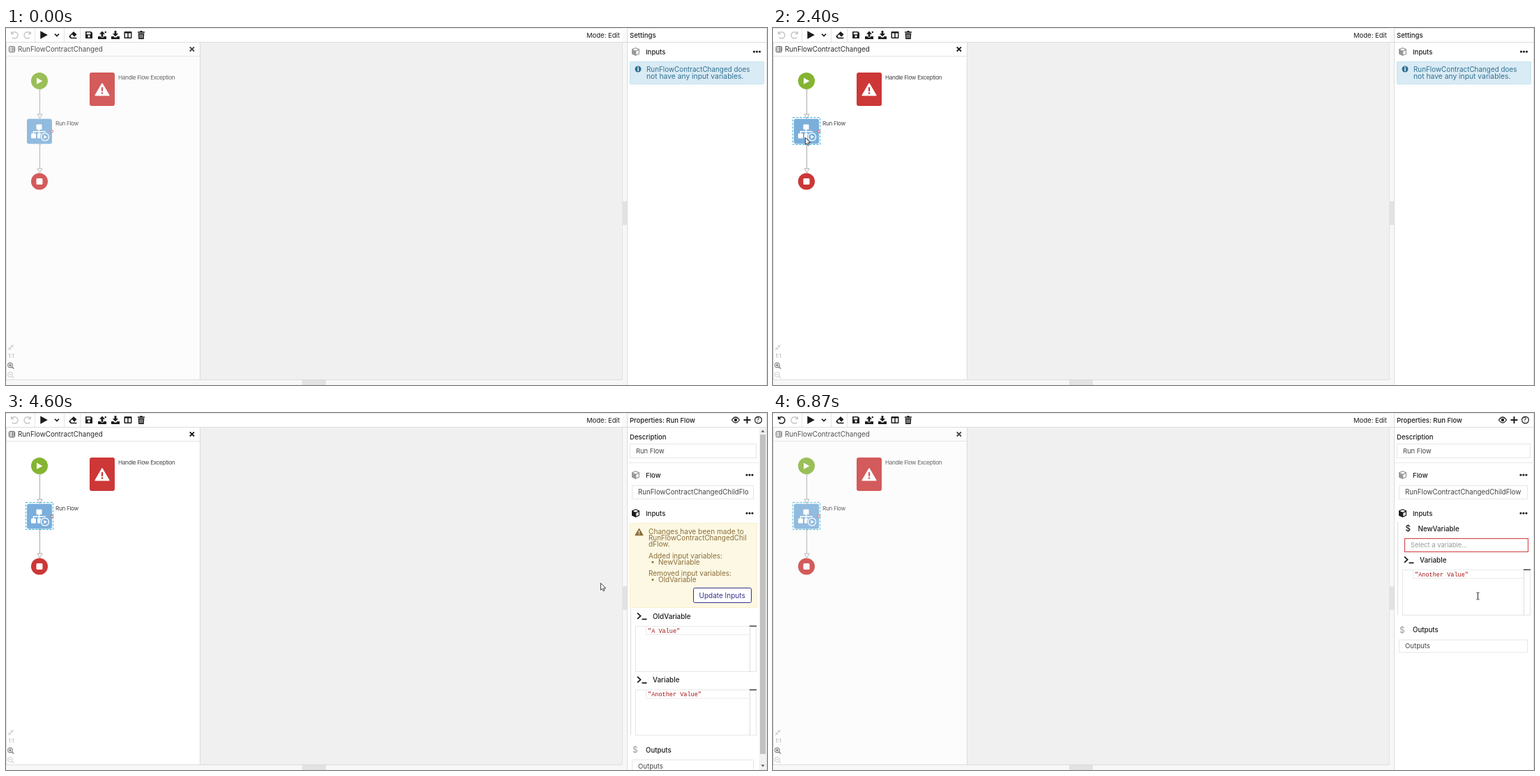
Write an HTML page that moves like this. It is 1092x513 px and loops after 7.67 s.

```html
<!DOCTYPE html>
<html lang="en">
<head>
<meta charset="utf-8">
<title>Flow editor</title>
<style>
  html, body { margin: 0; width: 100%; height: 100%; overflow: hidden; background: #fff; }
  svg { display: block; width: 100%; height: 100%; }
  text { font-family: Inter, "Open Sans", sans-serif; white-space: pre; }
  .mono { font-family: "Liberation Mono", "DejaVu Sans Mono", monospace; }
  .label { letter-spacing: -.33px; }
</style>
</head>
<body>
<svg id="stage" viewBox="0 0 1092 513"></svg>
<script>
const INK = '#1c1c1c', SOFT = '#444', LINE = '#dcdcdc', FIELD = '#e6e6e6',
  PALE = '#c8c8c8', NAVY = '#34328c', BROWN = '#8a6d3b';

// y is the middle of the capitals
const text = (x, y, s, size = 9.8, fill = INK, extra = '') =>
  `<text x="${x}" y="${y + size * .36}" font-size="${size}" fill="${fill}" ${extra}>${s}</text>`;
const strong = (x, y, s, size = 9.6) => text(x, y, s, size, INK, 'font-weight="500"');
const rect = (x, y, w, h, fill, extra = '') =>
  `<rect x="${x}" y="${y}" width="${w}" height="${h}" fill="${fill}" ${extra}/>`;
const frame = (x1, y1, x2, y2, stroke = FIELD, fill = '#fff', extra = '') =>
  rect(x1 + .5, y1 + .5, x2 - x1 - 1, y2 - y1 - 1, fill, `stroke="${stroke}" ${extra}`);
const fillPath = (d, fill = INK, extra = '') => `<path d="${d}" fill="${fill}" ${extra}/>`;
const linePath = (d, stroke = INK, w = 1, extra = '') =>
  `<path d="${d}" fill="none" stroke="${stroke}" stroke-width="${w}" ${extra}/>`;
const dot = (x, y, r, fill, extra = '') => `<circle cx="${x}" cy="${y}" r="${r}" fill="${fill}" ${extra}/>`;
const at = (x, y, s, extra = '') => `<g transform="translate(${x} ${y}) ${extra}">${s}</g>`;
const group = (id, s) => `<g id="${id}">${s}</g>`;

const undoArrow = linePath('M-4.3 -5V-1.4H-.8M-4 -1.6A4.7 4.7 0 1 1 -3.3 3.4', 'currentColor', 1.5);
const more = (x, y) => [-4, 0, 4].map(d => dot(x + d, y, 1.6, INK)).join('');
const cube = (y, color) => at(903.5, y,
  fillPath('M0 -6L5.5 -3.7V3.4L0 6L-5.5 3.4V-3.7Z', color) +
  fillPath('M0 -4.7L3.9 -3.1L0 -1.5L-3.9 -3.1ZM.8 -.2L4.3 -1.7V2.7L.8 4.3Z', '#fff'));
const prompt = y => linePath(`M906 ${y - 4.5}l4.6 4.2l-4.6 4.2M912.5 ${y + 4.3}h7`, INK, 1.7);
const warning = (x, y, size, fill, mark) => at(x, y,
  fillPath('M0 -8.5L10 8.5H-10Z', fill, `stroke="${fill}" stroke-width="2" stroke-linejoin="round"`) +
  rect(-1.2, -3.5, 2.4, 6, mark) + dot(0, 5.2, 1.4, mark), `scale(${size})`);

function toolbar() {
  const tray = fillPath('M-6 2H-2.5L-1.5 3.5H1.5L2.5 2H6V6H-6Z');
  const arrow = (y, flip) => at(0, y, fillPath('M-1.4 4V0H-4L0 -4.3L4 0H1.4V4Z'), `scale(1 ${flip})`);
  return rect(0, 0, 1092, 21, '#fff') + rect(0, 0, 1092, 1, '#e6e6e6') + rect(0, 20, 1092, 1, LINE) +
    [41, 83, 106].map(x => rect(x, 1, 1, 19, '#e4e4e4')).join('') +
    `<g id="undo">${at(12, 10, undoArrow)}</g>` +
    `<g color="${PALE}">${at(31, 10, undoArrow, 'scale(-1 1)')}</g>` +
    fillPath('M49.3 4.2L59.8 10L49.3 15.8Z') +
    linePath('M70 8.5L73 11.5L76 8.5', INK, 1.7) +
    at(96, 10, fillPath('M-5.5 1.5L1 -5L5.5 -.8L1 3.8H5.5V5.2H-3L-5.5 2.8Z') +
      fillPath('M-3.7 1.7L-1.2 -.8L2 2.4L.6 3.8H-2Z', '#fff')) +
    at(119, 10, fillPath('M-5 -5H3L5 -3V5H-5Z') + rect(-3.3, -3.6, 5.6, 2.8, '#fff') + dot(0, 2, 1.7, '#fff')) +
    at(138, 10, tray + arrow(-1.2, 1)) + dot(142.8, 6, 1.2, INK) + at(157, 10, tray + arrow(-2, -1)) +
    at(175, 10, rect(-5.5, -5, 11, 10, INK, 'rx="1"') + rect(-4, -2.5, 3.3, 6, '#fff') + rect(.8, -2.5, 3.3, 6, '#fff')) +
    at(194, 10, fillPath('M-5 -4.7H-2L-1.2 -6H1.2L2 -4.7H5V-3.3H-5ZM-4.3 -2.5H4.3L3.8 6H-3.8Z') +
      linePath('M-2 -1V4.5M0 -1V4.5M2 -1V4.5', '#fff', .8)) +
    text(833, 10.5, 'Mode: Edit', 9.5);
}

function flowPanel() {
  const red = '#cd3737';
  const link = (y1, y2) => linePath(`M48.5 ${y1}V${y2 - 6}`, '#aaa') +
    dot(48.5, y1, 1.5, '#fff', 'stroke="#aaa" stroke-width=".8"') +
    fillPath(`M45 ${y2 - 6}H52L48.5 ${y2}Z`, '#fff', 'stroke="#999" stroke-width=".8"');
  return rect(0, 21, 278, 485, '#fff') + rect(0, 40, 278, 1, '#e2e2e2') + rect(0, 21, 1, 485, LINE) +
    frame(4, 26, 13, 35, '#444', '#fff', 'rx="1"') +
    linePath('M6 28.5H7M8 28.5H11.5M6 30.5H7M8 30.5H11.5M6 32.5H7M8 32.5H11.5', '#444') +
    text(17, 30.5, 'RunFlowContractChanged', 9.8, '#2c2c2c') +
    linePath('M263.8 27.3L270 33.5M270 27.3L263.8 33.5', INK, 1.9) +
    link(88, 130) + link(167, 208) +
    dot(48, 76, 12, '#85b431') + fillPath('M44 71.6L52.4 76.2L44 80.8Z', '#fff') +
    rect(120, 64, 36, 48, red, 'rx="3"') + warning(138, 88.5, .96, '#fff', red) +
    text(161, 71.5, 'Handle Flow Exception', 8.2, SOFT, 'class="label"') +
    rect(30, 130.5, 36, 36, '#7aaedb', 'rx="3"') +
    rect(43.5, 138.5, 8, 7.5, '#fff', 'rx="1"') + rect(36, 151.5, 7, 7, '#fff', 'rx="1"') +
    rect(45, 151.5, 6, 7, '#fff', 'rx="1"') + linePath('M47.5 145V152M39.5 152V148.8H56V152', '#fff', 1.5) +
    dot(56, 156.5, 6.6, '#fff', 'stroke="#7aaedb"') + dot(56, 156.5, 4.8, '#7aaedb') +
    fillPath('M54.3 153.7L59 156.5L54.3 159.3Z', '#fff') +
    dot(66, 148.5, 1.7, '#fff', `stroke="${red}" stroke-width=".9"`) +
    text(71, 137.5, 'Run Flow', 8.2, SOFT, 'class="label"') +
    group('selection', frame(28, 128, 68, 168, '#35b3d6', 'none', 'stroke-dasharray="3 2"')) +
    dot(48, 220.5, 12, red) + rect(43.5, 216, 9, 9, '#fff', 'rx="1.5"');
}

function zoomTools() {
  const lens = (y, color, sign) => `<circle cx="6" cy="${y}" r="3.5" fill="none" stroke="${color}"/>` +
    linePath(`M8.5 ${y + 2.5}L11.3 ${y + 5.2}${sign}`, color, 1.1);
  return linePath('M3 463L6.3 459.8M3.6 459.8H6.3V462.5M11 455L7.7 458.2M10.4 458.2H7.7V455.5', '#bbb', .9) +
    text(3.5, 471.5, '1:1', 7.5, '#aaa') +
    lens(484.5, '#666', 'M4 484.5H8M6 482.5V486.5') + lens(498, '#ccc', 'M4 498H8');
}

function settingsPanel() {
  const blue = '#31708f';
  return strong(895, 10.5, 'Settings') + cube(34, '#999') + strong(918, 34.5, 'Inputs') + more(1077.5, 34) +
    frame(895, 48, 1088, 81, '#c5e3ef', '#d9ebf5', 'rx="1"') +
    dot(907, 59, 4.5, blue) + rect(906.3, 58, 1.5, 3.8, '#fff') + dot(907, 56.5, .9, '#fff') +
    text(919, 59.5, 'RunFlowContractChanged does', 9.9, blue) +
    text(919, 68.8, 'not have any input variables.', 10.3, blue);
}

function propertiesTop(right) {
  return strong(895, 10.5, 'Properties: Run Flow', 9.5) +
    at(1047, 10, linePath('M-5.5 0Q0 -8 5.5 0Q0 8 -5.5 0Z', INK, 1.3) + dot(0, 0, 2.2, INK)) +
    linePath('M1058.5 10H1068.5M1063.5 5V15', INK, 2) +
    dot(1079.5, 10, 4.9, '#fff', `stroke="${INK}" stroke-width="1.2"`) + strong(1076.8, 10.2, '?', 8.5) +
    strong(895, 34.5, 'Description') + frame(895, 44, right, 65) + text(904, 54.5, 'Run Flow', 9.4, SOFT) +
    rect(893, 71, right - 890, 1, '#e8e8e8') +
    cube(89, '#999') + strong(918, 89.5, 'Flow') + more(right - 10, 89) + frame(898, 104, right - 4, 124) +
    `<svg x="899" y="104" width="${right - 911 + (right > 1080 ? 4 : 0)}" height="20">` +
    text(8, 9.7, 'RunFlowContractChangedChildFlow', 9.75, SOFT) + '</svg>' +
    cube(144, INK) + strong(918, 144.5, 'Inputs') + more(right - 10, 144);
}

function editor(name, y, right, value) {
  return prompt(y) + strong(928, y + .3, name, 9.9) +
    frame(903, y + 14, right, y + 80, FIELD) + frame(918, y + 14, right - 9, y + 27, '#ebebeb') +
    rect(right - 10, y + 14, 1, 66, LINE) + rect(right - 10, y + 13.5, 10, 1.5, '#444') +
    text(921, y + 20.5, `"${value}"`, 8.55, 'currentColor', 'class="mono"');
}

const outputs = (y, right) => text(899, y, '$', 12, '#999') + strong(918, y + .3, 'Outputs', 9.7) +
  frame(898, y + 14, right - 4, y + 33) + text(907, y + 23.3, 'Outputs', 9.6, SOFT);

function changedPanel() {
  const note = (x, y, s, size = 10) => text(x, y, s, size, BROWN);
  const bullet = (y, s) => dot(928, y, 1.5, BROWN) + note(936, y, s);
  return propertiesTop(1077) +
    frame(895, 158, 1078, 280, '#f8f0cf', '#fcf8e3') + warning(908.5, 171, .55, BROWN, '#fcf8e3') +
    note(922, 170, 'Changes have been made to', 10.15) + note(922, 179.5, 'RunFlowContractChangedChil', 9.9) +
    note(922, 188.8, 'dFlow.') + note(922, 205, 'Added input variables:') + bullet(214.3, 'NewVariable') +
    note(922, 230, 'Removed input variables:') + bullet(239.6, 'OldVariable') +
    '<rect id="button" x="986.5" y="251.5" width="83" height="21" rx="2"/>' +
    group('focus', frame(986, 251, 1070, 273, '#6e6cb0', 'none', 'rx="2"') +
      rect(988, 253, 80, 18, 'none', 'rx="1" stroke="#1d1b4a" stroke-width="2"')) +
    text(994.5, 262, 'Update Inputs', 10, NAVY) +
    rect(896, 281, 1, 182, '#ddd') + editor('OldVariable', 292, 1077, 'A Value') +
    editor('Variable', 383.5, 1077, 'Another Value') + outputs(484, 1077) +
    rect(1081, 21, 10, 492, '#f1f1f1') + rect(1082, 31, 8, 459, '#c1c1c1') +
    fillPath('M1083.5 27.5L1086 24.5L1088.5 27.5ZM1083.5 505.5L1086 508.5L1088.5 505.5Z', '#555');
}

function updatedPanel() {
  return propertiesTop(1087) + rect(896, 156, 1, 134, '#ddd') +
    strong(907.5, 166, '$', 11.5) + strong(925.5, 166.3, 'NewVariable', 9.8) +
    frame(906, 180, 1084, 200, '#d03a3a') + text(915, 190, 'Select a variable...', 9.4, '#999') +
    editor('Variable', 211, 1087, 'Another Value') + outputs(311.5, 1087);
}

const pointers = {
  arrow: fillPath('M.4 .5V10.4L2.7 8.4L4.2 11.8L5.9 11L4.4 7.8H7.6Z', '#fff', 'stroke="#111" stroke-width=".8"'),
  hand: fillPath('M-1.2 1Q0 -.6 1.2 1V5L5.4 6Q6.3 6.3 6.2 7.5L5.3 11V13.7H-.8V12L-3.8 8.3Q-4 6.8 -2.6 7L-1.2 8.3Z',
    '#fff', 'stroke="#111" stroke-width=".8"') + linePath('M1.2 5V8M3 5.6V8M4.7 6V8', '#111', .6),
  beam: at(1.5, 1, linePath('M-2 -5H-.6L0 -4.4L.6 -5H2M0 -4.4V4.4M-2 5H-.6L0 4.4L.6 5H2', '#222'))
};

document.getElementById('stage').innerHTML =
  rect(0, 0, 1092, 513, '#f7f7f7') + rect(0, 21, 884, 485, '#f0f0f0') +
  group('flow', flowPanel()) + zoomTools() + rect(278, 21, 1, 485, LINE) +
  rect(0, 505, 884, 1, LINE) + rect(425, 506, 34, 7, '#e2e2e2') +
  rect(884, 21, 1, 485, '#e4e4e4') + rect(884, 249, 7, 34, '#e2e2e2') +
  toolbar() + rect(884, 0, 7, 20, '#fafafa') +
  rect(891, 0, 201, 513, '#fff') + rect(891, 0, 201, 1, '#e6e6e6') + rect(891, 0, 1, 513, LINE) +
  rect(1091, 0, 1, 513, '#e0e0e0') + rect(891, 20, 201, 1, LINE) +
  group('settings', settingsPanel()) + group('changed', changedPanel()) + group('updated', updatedPanel()) +
  group('pointer', Object.keys(pointers).map(k => group(k, pointers[k])).join(''));

const el = id => document.getElementById(id);
const show = (id, on) => el(id).style.display = on ? '' : 'none';

// start, end, steps, then the place reached by the end
const moves = [
  [270, 1000, 12, 382, 347], [1070, 1800, 12, 47, 159], [1870, 2000, 2, 46, 157],
  [3400, 4130, 12, 611, 214], [4200, 4930, 12, 996, 262], [5000, 5070, 2, 1010, 262]
];

function pointerAt(t) {
  let x = 1096, y = 516;
  for (const [start, end, steps, toX, toY] of moves) {
    if (t < start) break;
    const step = Math.floor((t - start) / (end - start) * (steps - 1) + .1) + 1;
    const eased = (1 - Math.cos(Math.PI * Math.min(1, step / steps))) / 2;
    x += (toX - x) * eased;
    y += (toY - y) * eased;
  }
  return [x, y];
}

function draw(t) {
  const [x, y] = pointerAt(t);
  const pressed = t >= 5600, updated = t >= 6730, loaded = t >= 2730;
  const hover = x > 986 && x < 1070 && y > 251 && y < 273;
  const shape = t >= 6870 ? 'beam' : hover && !pressed ? 'hand' : 'arrow';

  show('settings', !loaded);
  show('changed', loaded && !updated);
  show('updated', updated);
  show('selection', t >= 2330);
  show('focus', pressed);
  el('flow').setAttribute('opacity', t < 2330 || pressed ? .8 : t < 2400 ? .9 : 1);
  el('undo').setAttribute('color', updated ? INK : PALE);
  el('changed').setAttribute('color', t < 2800 ? INK : '#a31515');
  el('updated').setAttribute('color', t < 6800 ? INK : '#a31515');
  el('button').setAttribute('fill', hover ? '#e8e4d6' : '#fff');
  el('button').setAttribute('stroke', NAVY);

  show('pointer', t >= 270);
  for (const name in pointers) show(name, name === shape);
  el('pointer').setAttribute('transform', `translate(${Math.round(x)} ${Math.round(y)})`);
}

const begin = performance.now();
function tick() {
  draw((performance.now() - begin) % 7670);
  requestAnimationFrame(tick);
}
tick();
</script>
</body>
</html>
```
